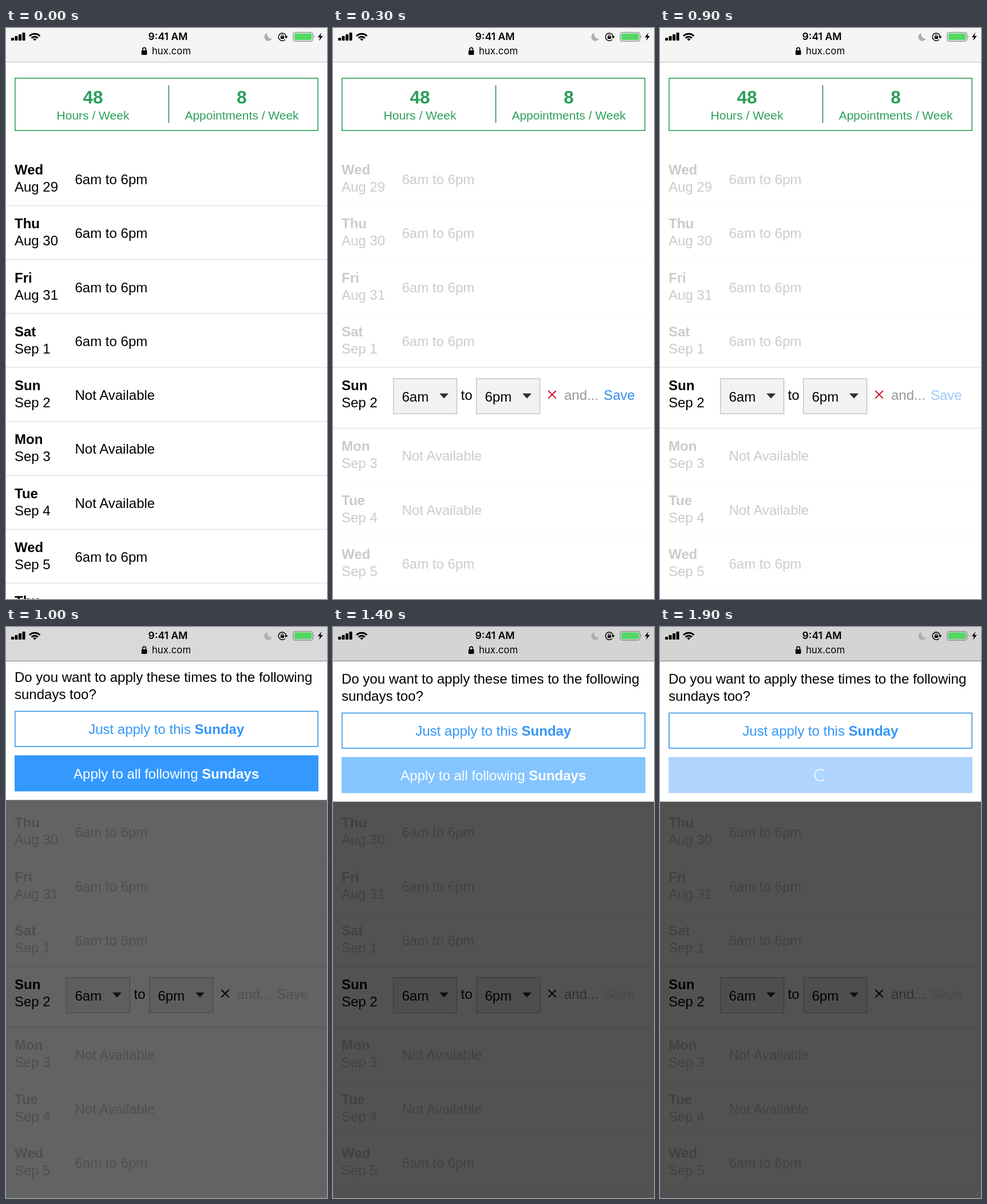
An HTML page that plays this animation: 561 by 998 pixels, repeating every 2 s.

```html
<!DOCTYPE html>
<html lang="en">
<head>
<meta charset="utf-8">
<title>Weekly availability</title>
<style>
  html, body { margin: 0; width: 100%; height: 100%; overflow: hidden; background: #fff; }
  svg { display: block; width: 100%; height: 100%; }
  text { font: 24px "Liberation Sans", Arial, sans-serif; white-space: pre; }
  .bold { font-weight: 700; }
  .mid { text-anchor: middle; }
  .rule { fill: #e3e3e3; }
  .green { fill: #2a9f58; }
  .small { font-size: 21px; }
  .big { font-size: 31.4px; font-weight: 700; }
  .blue { fill: #3396f8; }
  .status { font-family: Inter, Roboto, sans-serif; font-size: 16.8px; }
  .clock { font-size: 17.6px; font-weight: 600; }
</style>
</head>
<body>
<svg id="stage" viewBox="0 0 561 998" preserveAspectRatio="none">
  <rect width="561" height="998" fill="#fff"/>

  <g id="summary">
    <rect x="15.8" y="87.8" width="529.4" height="91.4" fill="none" stroke="#2a9f58" stroke-width="1.6"/>
    <rect class="green" x="283.6" y="100" width="1.7" height="66"/>
    <text class="green big mid" x="152" y="132">48</text>
    <text class="green small mid" x="152" y="160">Hours / Week</text>
    <text class="green big mid" x="412" y="132">8</text>
    <text class="green small mid" x="412" y="160">Appointments / Week</text>
  </g>

  <g id="before"></g>
  <g id="after"></g>

  <g id="sunday">
    <rect class="rule" y="592.6" width="561" height="1.5"/>
    <rect class="rule" id="sundayEnd" y="686.8" width="561" height="1.5"/>
    <text class="bold" x="15" y="633">Sun</text>
    <text x="15" y="663">Sep 2</text>
    <text id="closed" x="120.5" y="650">Not Available</text>
    <g id="editor">
      <g id="selects"></g>
      <text x="223.5" y="650">to</text>
      <path id="cross" d="M376.3 634l13.4 13.4M389.7 634l-13.4 13.4" fill="none" stroke-width="2"/>
      <text id="and" x="404" y="650">and...</text>
      <text id="save" x="473" y="650">Save</text>
    </g>
  </g>

  <rect id="shade" y="59" width="561" height="939" fill="#000"/>

  <g id="modal">
    <rect y="50" width="561" height="255.3" fill="#fff"/>
    <text x="15" y="99">Do you want to apply these times to the following</text>
    <text x="15" y="129">sundays too?</text>
    <rect x="15.8" y="150.4" width="529.4" height="61.4" fill="none" stroke="#3396e8" stroke-width="1.6"/>
    <text class="blue mid" x="280.2" y="190">Just apply to this <tspan class="bold">Sunday</tspan></text>
    <rect id="button" x="15" y="227.3" width="531" height="63"/>
    <text id="label" class="mid" x="280.2" y="268" fill="#fff">Apply to all following <tspan class="bold">Sundays</tspan></text>
    <path id="spinner" fill="none" stroke="#fff" stroke-width="1.6" d="M287.4 266a10 10 0 1 1 0-14.1"/>
  </g>

  <g id="header">
    <rect id="bar" width="561" height="59"/>
    <rect id="barEdge" y="59" width="561" height="1"/>
    <g id="signal"></g>
    <g fill="none" stroke="#000" stroke-width="3">
      <path d="M41 14a13 13 0 0 1 18.4 0"/>
      <path d="M44.6 17.6a8 8 0 0 1 11.2 0"/>
    </g>
    <path d="M47.2 19.4a4.2 4.2 0 0 1 6 0l-3 3.2z"/>
    <text class="status clock mid" x="283" y="21.4">9:41 AM</text>
    <rect x="236.8" y="39" width="9.6" height="8" rx="1.2"/>
    <path d="M238.8 40v-2.8a2.8 2.8 0 0 1 5.6 0V40" fill="none" stroke="#000" stroke-width="1.6"/>
    <text class="status mid" x="289" y="46.3">hux.com</text>
    <path d="M457 8.8a7 7 0 1 0 8 9.4a7 7 0 0 1-8-9.4z" fill="#aeaeb2"/>
    <path d="M487.8 20.2a6.7 6.7 0 1 1 1.8-4.6" fill="none" stroke="#000" stroke-width="1.5"/>
    <path d="M486.6 14.6h6l-3 3.8z"/>
    <rect x="479.8" y="14.4" width="6.2" height="4.6" rx=".6"/>
    <path d="M481.2 14.6v-1.2a1.7 1.7 0 0 1 3.4 0v1.2" fill="none" stroke="#000" stroke-width="1.1"/>
    <rect x="502" y="7.6" width="34.4" height="15.4" rx="3.6" fill="none" stroke="#8e8e90" stroke-width="1.4"/>
    <rect x="504" y="9.6" width="30.4" height="11.4" rx="1.8" fill="#53d863"/>
    <path d="M538 12.8q2.4 2.4 0 5z" fill="#8e8e90"/>
    <path d="M551.4 8l-6.6 8.2h4l-1.8 6.2 6.8-8.4h-4.2z"/>
  </g>
</svg>

<script>
const $ = id => document.getElementById(id);
const STEP = 100, STEPS = 20, PITCH = 94.25, SUNDAY = 4;

const days = ['Wed', 'Thu', 'Fri', 'Sat', 'Sun', 'Mon', 'Tue', 'Wed', 'Thu'];
const dateOf = i => i < 3 ? `Aug ${29 + i}` : `Sep ${i - 2}`;
const hoursOf = i => i >= 4 && i <= 6 ? 'Not Available' : '6am to 6pm';

function row(i) {
  const y = i * PITCH;
  const rule = i === SUNDAY - 1 ? '' :
    `<rect class="rule" y="${309.8 + y}" width="561" height="1.5"/>`;
  return `<text class="bold" x="15" y="${256 + y}">${days[i]}</text>
    <text x="15" y="${286 + y}">${dateOf(i)}</text>
    <text x="120.5" y="${273 + y}">${hoursOf(i)}</text>${rule}`;
}

const select = (x, label) => `
  <rect x="${x + .7}" y="612.7" width="110.8" height="61.6" fill="#f2f2f2" stroke="#c6c6c6" stroke-width="1.5"/>
  <text x="${x + 15.5}" y="653">${label}</text>
  <path d="M${x + 81} 638.8h16l-8 8.8z" fill="#2c2f3a"/>`;

days.forEach((_, i) => {
  if (i !== SUNDAY) $(i < SUNDAY ? 'before' : 'after').innerHTML += row(i);
});
$('selects').innerHTML = select(105, '6am') + select(250, '6pm');
$('signal').innerHTML = [0, 1, 2, 3].map(i => {
  const h = 5 + i * 3;
  return `<rect x="${9 + i * 6.5}" y="${22 - h}" width="5" height="${h}" rx="1"/>`;
}).join('');

const set = (id, attrs) => {
  for (const key in attrs) $(id).setAttribute(key, attrs[key]);
};
const show = (id, on) => set(id, { visibility: on ? 'visible' : 'hidden' });

// Each table lists [first step, value]; the value holds until the next entry.
const pick = (table, n) => table.filter(([from]) => from <= n).pop()[1];

const fade = [[0, 1], [2, .55], [3, .2]];
const saveTint = [[0, '#338eea'], [8, '#66aef2'], [9, '#9ccaf7'], [10, '#d2d2d2'], [11, '#dcdee0']];
const andTint = [[0, '#999'], [10, '#d0d0d0'], [11, '#8a98a8']];
const shade = [[0, 0], [10, .61], [11, .68]];
const barTint = [[0, '#f5f5f5'], [10, '#d9d9d9'], [11, '#d4d4d4']];
const buttonTint = [[0, '#3399ff'], [13, '#5cafff'], [14, '#84c5ff'], [18, '#9acdff'], [19, '#b0d5ff']];

function draw(n) {
  const editing = n >= 2, asking = n >= 10, loading = n >= 17;
  const grow = editing ? 12 : 0;

  set('before', { opacity: pick(fade, n) });
  set('after', { opacity: pick(fade, n), transform: `translate(0 ${grow})` });
  set('sundayEnd', { y: 686.8 + grow });
  show('closed', !editing);
  show('editor', editing);
  set('cross', { stroke: asking ? '#000' : '#cc1022' });
  set('and', { fill: pick(andTint, n) });
  set('save', { fill: pick(saveTint, n) });

  set('shade', { opacity: pick(shade, n) });
  set('bar', { fill: pick(barTint, n) });
  set('barEdge', { fill: asking ? '#7c7c7c' : '#bdbdbd' });

  set('modal', { display: asking ? 'inline' : 'none', transform: `translate(0 ${n === 10 ? -3 : 0})` });
  set('button', { fill: pick(buttonTint, n) });
  show('label', !loading);
  show('spinner', loading);
  set('spinner', { transform: `rotate(${(n - 19) * 72} 280.3 259)` });
}

const start = performance.now();
let last = -1;
function tick() {
  const n = Math.floor((performance.now() - start) / STEP) % STEPS;
  if (n !== last) draw(last = n);
  requestAnimationFrame(tick);
}
tick();
</script>
</body>
</html>
```
